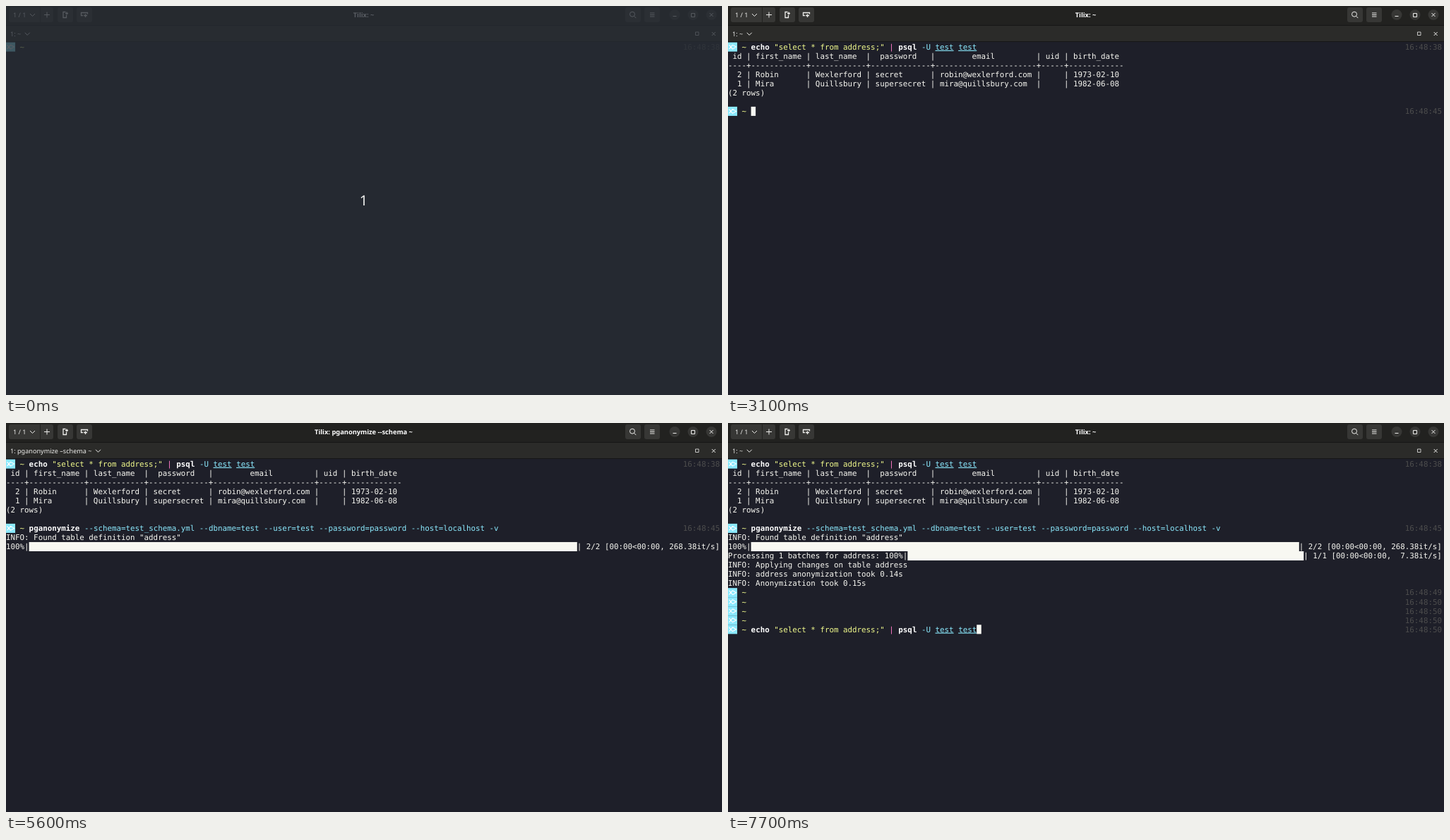
Recreate the animation shown at these times as an HTML page. Size 1014 by 552 pixels, loop 8000 ms.

```html
<!DOCTYPE html>
<html lang="en">
<head>
<meta charset="utf-8">
<title>Terminal</title>
<style>
  html, body { margin: 0; width: 100%; height: 100%; overflow: hidden; background: #1e1f29; }
  svg { display: block; width: 1014px; height: 552px; }
  text { white-space: pre; text-rendering: geometricPrecision; }
  .ui { font: 9.1px "Noto Sans", "Open Sans", sans-serif; fill: #eeeeec; }
  .title { font-weight: 700; font-size: 9.3px; text-anchor: middle; fill: #fff; }
  .count { font-size: 20px; text-anchor: middle; }
  .term { font: 10.834px "DejaVu Sans Mono", "Noto Sans Mono", monospace; fill: #f8f8f2; }
  .b { font-weight: 700; fill: #fff; }
  .y { fill: #f1fa8c; }
  .m { fill: #ff79c6; }
  .c { fill: #8be9fd; }
  .r { fill: #ff5555; }
  .g { fill: #4d4d4d; }
  .d { fill: #1e1f29; }
  .u { text-decoration: underline; }
  .btn { fill: #373735; }
  .ico { fill: none; stroke: #eeeeec; stroke-width: 1; }
</style>
</head>
<body>
<svg id="stage" viewBox="0 0 1014 552" xml:space="preserve">
  <rect width="1014" height="552" fill="#1e1f29"/>
  <rect width="1014" height="27" fill="#222220"/>
  <rect y="27" width="1014" height="24" fill="#2b2b29"/>
  <path d="M0 27.5H1014M0 50.5H1014" stroke="#161616"/>
  <g class="btn">
    <rect x="4" y="2" width="63" height="21" rx="3"/>
    <rect x="73" y="2" width="22" height="21" rx="3"/>
    <rect x="100" y="2" width="22" height="21" rx="3"/>
    <rect x="877" y="2" width="22" height="21" rx="3"/>
    <rect x="904" y="2" width="22" height="21" rx="3"/>
    <circle cx="947" cy="12.5" r="7.5"/>
    <circle cx="973" cy="12.5" r="7.5"/>
    <circle cx="999" cy="12.5" r="7.5"/>
  </g>
  <path d="M48.5 2V23" stroke="#222220"/>
  <g class="ico">
    <path d="M34 11l3.5 3.5L41 11M54 12.5h8M58 8.5v8"/>
    <path d="M84.5 8.5H81V16.5H85.5V13M84 10.5h4M86 8.5v4" stroke-width="1.3"/>
    <path d="M109 13.5H106.5V9.5H115.5V11.5M110 13.5h5M112.5 11.5v4.5" stroke-width="1.3"/>
    <circle cx="887" cy="11.7" r="3.5"/>
    <path d="M889.5 14.3l2.8 2.8M912 10h6.500M912 12.500h6.500M912 15h6.500"/>
    <path d="M944.500 14.500h5M970.500 10.500h5v5h-5zM996.500 10l5 5m0-5l-5 5"/>
    <path d="M976.500 37h4.500v4.500h-4.500z" stroke-width=".8"/>
    <path d="M999.700 37l5 5m0-5l-5 5"/>
    <path id="chevron" d="M-3.500-1.700l3.500 3.500l3.500-3.500"/>
  </g>
  <text class="ui" x="10" y="16">1 / 1</text>
  <text class="ui title" id="title" x="506.500" y="16"></text>
  <text class="ui" id="tab" x="6" y="42.500"></text>
  <g class="term" id="term"></g>
  <g id="veil">
    <rect width="1014" height="552" fill="rgb(39,45,53)" opacity=".77"/>
    <text class="ui count" x="506.500" y="283">1</text>
  </g>
</svg>
<script>
const LOOP = 8000, CW = 1011 / 155, RH = 13.04, TOP = 51.6;
const $ = id => document.getElementById(id);
const term = $('term');

const ECHO = [
  ['echo', 'b'], [' '], ['"select * from address;"', 'y'], [' '], ['|', 'm'], [' '],
  ['psql', 'b'], [' '], ['-U', 'c'], [' '], ['test', 'c u'], [' '], ['test', 'c u']
];
const ANON = [
  ['pganonymize', 'b'],
  [' --schema=test_schema.yml --dbname=test --user=test --password=password --host=localhost -v', 'c']
];
const TABLE = [
  ' id | first_name | last_name  |  password   |        email         | uid | birth_date',
  [4, 12, 12, 13, 22, 5, 12].map(n => '-'.repeat(n)).join('+'),
  '  2 | Robin      | Wexlerford | secret      | robin@wexlerford.com |     | 1973-02-10',
  '  1 | Mira       | Quillsbury | supersecret | mira@quillsbury.com  |     | 1982-06-08',
  '(2 rows)'
];
const plain = segs => segs.map(s => s[0]).join('');

function add(tag, attrs, text) {
  const node = document.createElementNS('http://www.w3.org/2000/svg', tag);
  for (const k in attrs) node.setAttribute(k, attrs[k]);
  if (text) node.textContent = text;
  term.append(node);
}

function block(row, col, cols, fill) {
  add('rect', { x: col * CW, y: TOP + row * RH, width: cols * CW, height: RH, fill });
}

function write(row, col, text, cls = '') {
  if (text.trim()) add('text', { x: col * CW, y: TOP + row * RH + 10.3, class: cls }, text);
}

function writeAll(row, col, segs) {
  for (const [text, cls] of segs) {
    write(row, col, text, cls);
    col += text.length;
  }
}

const cursor = (row, col) => block(row, col, 1, '#f8f8f2');

function prompt(row, clock) {
  const y = TOP + row * RH;
  block(row, 0, 2, '#8be9fd');
  add('path', {
    d: `M1.500 ${y + 3.500}l5 6M1.500 ${y + 9.500}l5-6M6.500 ${y + 3.500}l5 3l-5 3`,
    fill: 'none', stroke: '#fff', 'stroke-width': 1.1
  });
  write(row, 3, '~', 'y');
  write(row, 147, '16:48:' + clock, 'g');
}

// Typed part, then the dimmed suggestion with the cursor on its first character.
function typing(row, segs, n, cls) {
  const all = plain(segs);
  write(row, 5, all.slice(0, n), cls);
  block(row, 5 + n, 1, '#4d4d4d');
  write(row, 5 + n, all[n], 'd');
  write(row, 6 + n, all.slice(n + 1), 'g');
}

function command(row, segs, withCursor) {
  writeAll(row, 5, segs);
  if (withCursor) cursor(row, 5 + plain(segs).length);
}

function firstCommand(t) {
  prompt(0, 38);
  if (t >= 1200) command(0, ECHO, t < 1900);
  else if (t >= 1000) typing(0, ECHO, 5, 'b');
  else if (t >= 800) typing(0, ECHO, 4, 'b');
  else if (t >= 400) typing(0, ECHO, Math.min(3, Math.floor(t / 100) - 3), 'r');
  else if (t >= 300) cursor(0, 5);
  if (t >= 2000 && t < 2100) cursor(1, 0);
}

function secondCommand(t) {
  TABLE.forEach((s, i) => write(i + 1, 0, s));
  prompt(7, 45);
  if (t >= 4500) command(7, ANON, t < 5000 || (t >= 5200 && t < 5300));
  else if (t >= 3900) typing(7, ANON, 4, 'r');
  else if (t >= 3600) typing(7, ANON, 2, 'r');
  else if (t >= 3400) typing(7, ANON, 1, 'r');
  else if (t < 2500 || t >= 3100) cursor(7, 5);
  if (t >= 5300 && t < 5600) cursor(8, 0);
}

function progress(row, label, tail) {
  const end = 155 - tail.length;
  write(row, 0, label);
  block(row, label.length, end - label.length, '#f8f8f2');
  write(row, end, tail);
}

function report(t) {
  write(8, 0, 'INFO: Found table definition "address"');
  progress(9, '100%|', '| 2/2 [00:00<00:00, 268.38it/s]');
  if (t < 5700) return;
  progress(10, 'Processing 1 batches for address: 100%|', '| 1/1 [00:00<00:00,  7.38it/s]');
  write(11, 0, 'INFO: Applying changes on table address');
  write(12, 0, 'INFO: address anonymization took 0.14s');
  write(13, 0, 'INFO: Anonymization took 0.15s');
}

function lastPrompts(t) {
  const extra = Math.max(0, Math.min(4, Math.floor((t - 6800) / 100)));
  for (let i = 0; i <= extra; i++) prompt(14 + i, i ? 50 : 49);
  if (t >= 7700) command(18, ECHO, true);
  else if (t >= 7400) command(18, ANON, true);
  else if (t >= 6400) cursor(14 + extra, 5);
}

function setTitle(t) {
  const running = t >= 2000 && t < 2100 ? ECHO : t >= 5300 && t < 5800 ? ANON : null;
  const name = running ? plain(running).slice(0, 20) + ' ~' : '~';
  $('title').textContent = 'Tilix: ' + name;
  $('tab').textContent = '1: ' + name.replace('--', '–');
  const x = 6 + $('tab').getComputedTextLength() + 9;
  $('chevron').setAttribute('transform', `translate(${x} 39.500)`);
}

function draw(t) {
  term.replaceChildren();
  setTitle(t);
  firstCommand(t);
  if (t >= 2100) secondCommand(t);
  if (t >= 5600) report(t);
  if (t >= 5800) lastPrompts(t);
  $('veil').style.display = t < 100 ? '' : 'none';
}

let shown = -1;
function tick() {
  const step = Math.floor((performance.now() % LOOP) / 100);
  if (step !== shown) draw((shown = step) * 100);
  requestAnimationFrame(tick);
}
tick();
</script>
</body>
</html>
```
